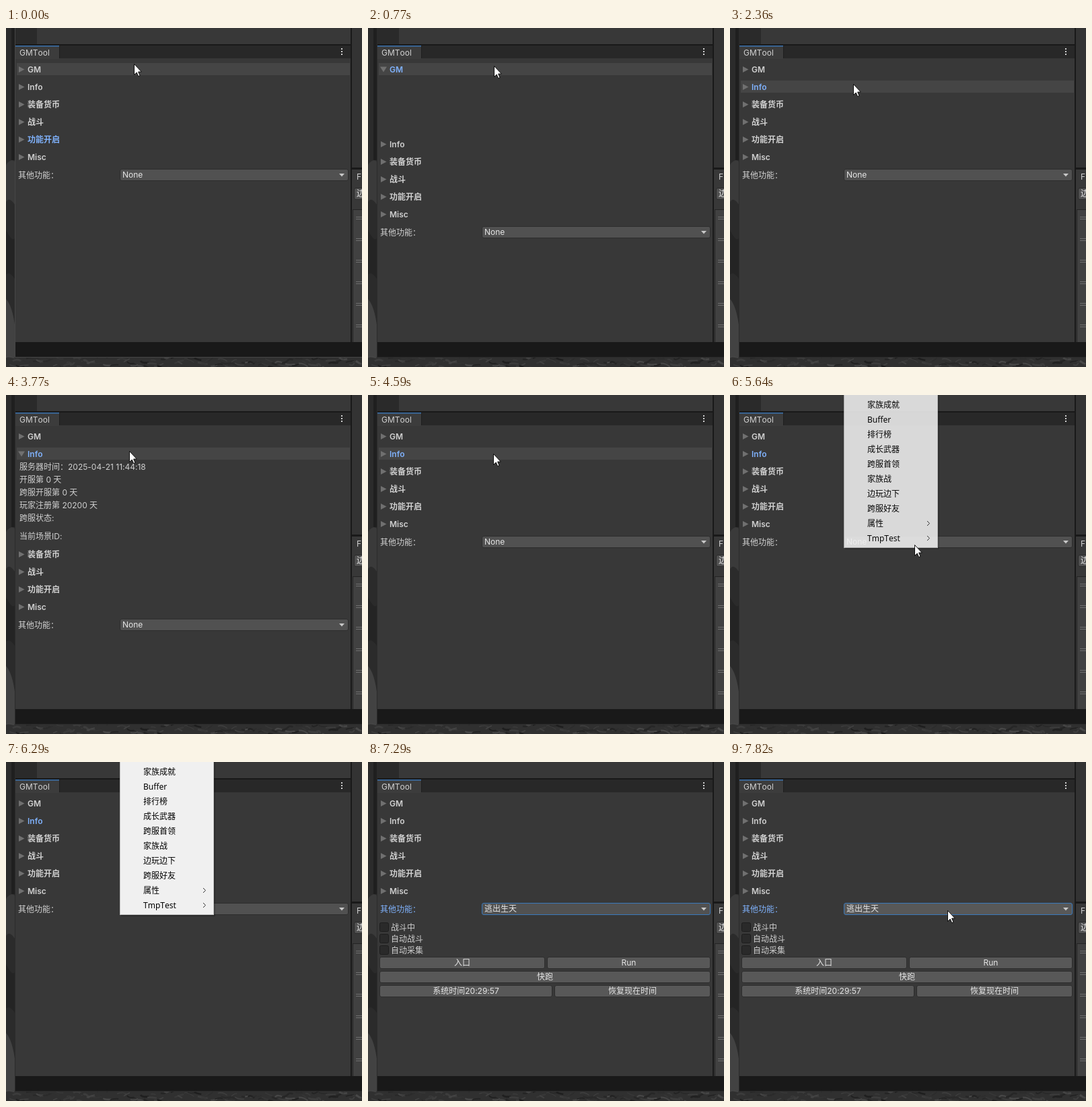
Write an HTML page that moves like this. It is 529 px wide and 503 px high and loops after 8 s.

```html
<!DOCTYPE html>
<html lang="zh-CN">
<head>
<meta charset="utf-8">
<title>GMTool</title>
<style>
  html, body { margin: 0; width: 100%; height: 100%; overflow: hidden; background: #191919; }
  svg { display: block; width: 529px; height: 503px; }
  text {
    font: 12px Inter, "Noto Sans CJK SC", "Noto Sans CJK JP", sans-serif;
    font-kerning: none; font-feature-settings: "calt" 0;
    fill: #d0d0d0; white-space: pre;
  }
  .b { font-weight: 600; }
  .blue { fill: #7fb1fb; }
  .ctl { fill: #e6e6e6; }
  .mid { text-anchor: middle; }
  .menu text { font-family: "Noto Sans", "Noto Sans CJK SC", "Noto Sans CJK JP", sans-serif; fill: #000; }
</style>
</head>
<body>
<svg viewBox="0 0 529 503">
  <g id="back"></g>
  <path id="edge" d="M13.5 0V488.5H529" fill="none"/>
  <g id="ui"></g>
  <path id="cursor" d="M-.5 .5V16.5L3.2 13 5.7 18.6 8 17.6 5.6 12H10.3Z" fill="#fff" stroke="#000" stroke-width=".9"/>
</svg>
<script>
const LOOP = 8000, STEP = 40;
const FOLDS = ['GM', 'Info', '装备货币', '战斗', '功能开启', 'Misc'];
const MENU = ['家族成就', 'Buffer', '排行榜', '成长武器', '跨服首领', '家族战', '边玩边下', '跨服好友', '属性', 'TmpTest'];
const $ = id => document.getElementById(id);

const rect = (x, y, w, h, fill, more = '') =>
  `<rect x="${x}" y="${y}" width="${w}" height="${h}" fill="${fill}" ${more}/>`;
const text = (x, y, s, cls = '') => `<text x="${x}" y="${y}" class="${cls}">${s}</text>`;
const shape = (d, fill) => `<path d="${d}" fill="${fill}"/>`;
const box = (x, y, w, fill, edge = '#2d2d2d') =>
  rect(x + .5, y + .5, w - 1, 17, fill, `rx="2.5" stroke="${edge}"`);
const button = (x, y, w, s) => box(x, y, w, '#585858') + text(x + w / 2, y + 13, s, 'ctl mid');

// Dim desktop picture: large soft shapes at the left, fine strokes along the bottom
function desktop() {
  let seed = 7;
  const rnd = a => (seed = seed * 16807 % 2147483647) / 2147483647 * a;
  let s = rect(0, 0, 529, 503, '#2b2b2b') + rect(8, 0, 5, 196, '#1f1f1f');
  s += shape('M0 203Q7 193 13 198V262Q5 250 0 258Z', '#3a3a3a');
  s += shape('M0 300Q9 318 13 312V372Q5 360 0 366Z', '#242424');
  s += shape('M0 402Q9 412 13 440V503H0Z', '#424242');
  s += rect(0, 488, 529, 15, '#303030');
  for (let x = 0; x < 529; x += 5) {
    const y = 489 + rnd(14), g = 28 + rnd(46) | 0;
    s += `<path d="M${x} ${y}q${rnd(8)} ${rnd(10) - 5} ${6 + rnd(9)} ${rnd(10) - 5}" fill="none" stroke="rgb(${g},${g},${g})" stroke-width="${1 + rnd(2)}"/>`;
  }
  return s;
}

// Window frame and neighbouring panels
function frame() {
  let s = rect(13, 0, 516, 488, '#191919') + rect(14, 0, 32, 24, '#2a2a2a') + rect(46, 0, 466, 24, '#383838');
  s += rect(14, 26, 498, 19, '#282828') + rect(14, 45, 498, 421, '#383838');
  s += rect(14, 26, 65, 20, '#3c3c3c') + rect(14, 26, 65, 1.5, '#3a72b0') + rect(79, 26, 1, 19, '#1f1f1f');
  s += text(20, 41, 'GMTool');
  for (const y of [31, 35, 39]) s += rect(498, y - 1, 2, 2, '#d2d2d2');
  s += rect(514, 0, 15, 207, '#333') + rect(514, 210, 15, 256, '#383838') + text(521, 225, 'F');
  s += rect(517.5, 237.5, 20, 17, '#515151', 'rx="2.5" stroke="#2a2a2a"') + text(521, 250, '边', 'ctl');
  s += rect(515.5, 269.5, 20, 200, '#414141', 'stroke="#242424"') + rect(514, 466, 15, 22, '#191919');
  for (let y = 280; y < 450; y += 32) s += rect(520, y, 9, 1, '#707070') + rect(520, y + 3, 9, 1, '#707070');
  return s;
}

// Cursor moves: start, end, target
const MOVES = [
  [40, 120, 188, 56],
  [1640, 1640, 188, 57],
  [1960, 2160, 184, 83],
  [4590, 4950, 274, 223],
  [5320, 5320, 275, 222]
];

function cursorAt(t) {
  if (t >= 7580) {
    const p = Math.min(1, Math.floor((t - 7580) / STEP) / 6), e = p * (2 - p);
    return [316 + 8 * p + 24 * p * (1 - p), 43 + 177 * e];
  }
  if (t >= 6290) return null;
  if (t >= 6050) {
    const p = (Math.floor((t - 6050) / STEP) + 1) / 6.5;
    return [275 + 135 * p * p, 222 - 236 * p];
  }
  let x = 191, y = 53;
  for (const [from, to, tx, ty] of MOVES) {
    if (t < from) break;
    const n = Math.round((to - from) / STEP) + 1;
    const p = Math.min(1, (Math.floor((t - from) / STEP) + 1) / n);
    const e = p * p * (3 - 2 * p);
    x += (tx - x) * e;
    y += (ty - y) * e;
  }
  return [Math.round(x), Math.round(y)];
}

function infoLines(t) {
  const sec = 16 + (t >= 2770) + (t >= 3770);
  return ['服务器时间：2025-04-21 11:44:' + sec, '开服第 0 天', '跨服开服第 0 天', '玩家注册第 20200 天', '跨服状态:', '当前场景ID:']
    .map((s, i) => text(20, 111 + 19 * i + (i > 4 ? 8 : 0), s)).join('');
}

function fold(name, y, open, active, hover) {
  const arrow = open ? `M18 ${y - 3.5}H28L23 ${y + 4.5}Z` : `M19 ${y - 4}L27.5 ${y + .5}L19 ${y + 5}Z`;
  return (hover ? rect(16, y - 9, 495, 18, '#454545') : '') + shape(arrow, '#707070') +
    text(32, y + 5, name, active ? 'b blue' : 'b');
}

function popup(alpha, cur) {
  let s = `<g class="menu" opacity="${alpha}">` + rect(171, -5, 140, 234, '#000', 'opacity=".22"') +
    rect(169.5, -5, 139, 231.5, '#f0f0f0', 'stroke="#bcbcbc"');
  MENU.forEach((name, i) => {
    const y = 4 + 22 * i;
    if (cur && cur[0] < 307 && cur[1] >= y && cur[1] < y + 22) s += rect(172, y, 134, 22, '#91c9f7');
    s += text(204, y + 15, name);
    if (i > 7) s += `<path d="M293 ${y + 7}l3.5 3.5-3.5 3.5" fill="none" stroke="#333"/>`;
  });
  return s + '</g>';
}

function tools() {
  let s = '';
  ['战斗中', '自动战斗', '自动采集'].forEach((name, i) => {
    const y = 238 + 17 * i;
    s += rect(17.5, y + .5, 13, 13, '#2a2a2a', 'rx="2" stroke="#1d1d1d"') + text(34, y + 12, name);
  });
  return s + button(17, 289, 246, '入口') + button(266, 289, 243, 'Run') + button(17, 310, 492, '快跑') +
    button(17, 331, 257, '系统时间20:29:57') + button(277, 331, 232, '恢复现在时间');
}

function view(t, cur) {
  const done = t >= 7290, menuOn = t >= 5560 && !done;
  const gmOpen = t >= 770 && t < 1800, infoOpen = t >= 2480 && t < 4390;
  const active = done ? -1 : t < 650 ? 4 : t < 2360 ? 0 : 1;
  const over = y => cur && !menuOn && cur[1] >= y - 9 && cur[1] < y + 9;
  let s = '', shift = 0;
  FOLDS.forEach((name, i) => {
    const y = 61 + 26 * i + shift, open = i == 0 && gmOpen || i == 1 && infoOpen;
    s += fold(name, y, open, i == active, over(y));
    if (open) shift += i ? 123 : 85;
  });
  if (infoOpen) s += infoLines(t);
  const y = 209 + shift;
  s += text(18, y + 14, '其他功能：', done ? 'blue' : '');
  s += box(169, y, 340, over(y + 9) ? '#585858' : '#515151', done ? '#3a79bb' : '#2d2d2d');
  s += text(173, y + 13, done ? '逃出生天' : 'None', 'ctl') + shape(`M495 ${y + 7}h8l-4 4.5z`, '#c8c8c8');
  if (done) s += tools();
  if (menuOn) s += popup(t < 5600 ? .3 : t < 5640 ? .62 : t < 5680 ? .88 : 1, t >= 6050 ? cur : null);
  return s;
}

$('back').innerHTML = desktop() + frame();
let last = '';
function draw(t) {
  const cur = cursorAt(t), s = view(t, cur);
  if (s !== last) $('ui').innerHTML = last = s;
  // The window outline darkens once the window takes focus
  $('edge').setAttribute('stroke', t < 490 ? '#464646' : '#2b2b2b');
  $('cursor').setAttribute('visibility', cur ? 'visible' : 'hidden');
  if (cur) $('cursor').setAttribute('transform', `translate(${cur})`);
}

let start;
function tick(now) {
  start ??= now;
  draw((now - start) % LOOP);
  requestAnimationFrame(tick);
}
draw(0);
requestAnimationFrame(tick);
</script>
</body>
</html>
```
